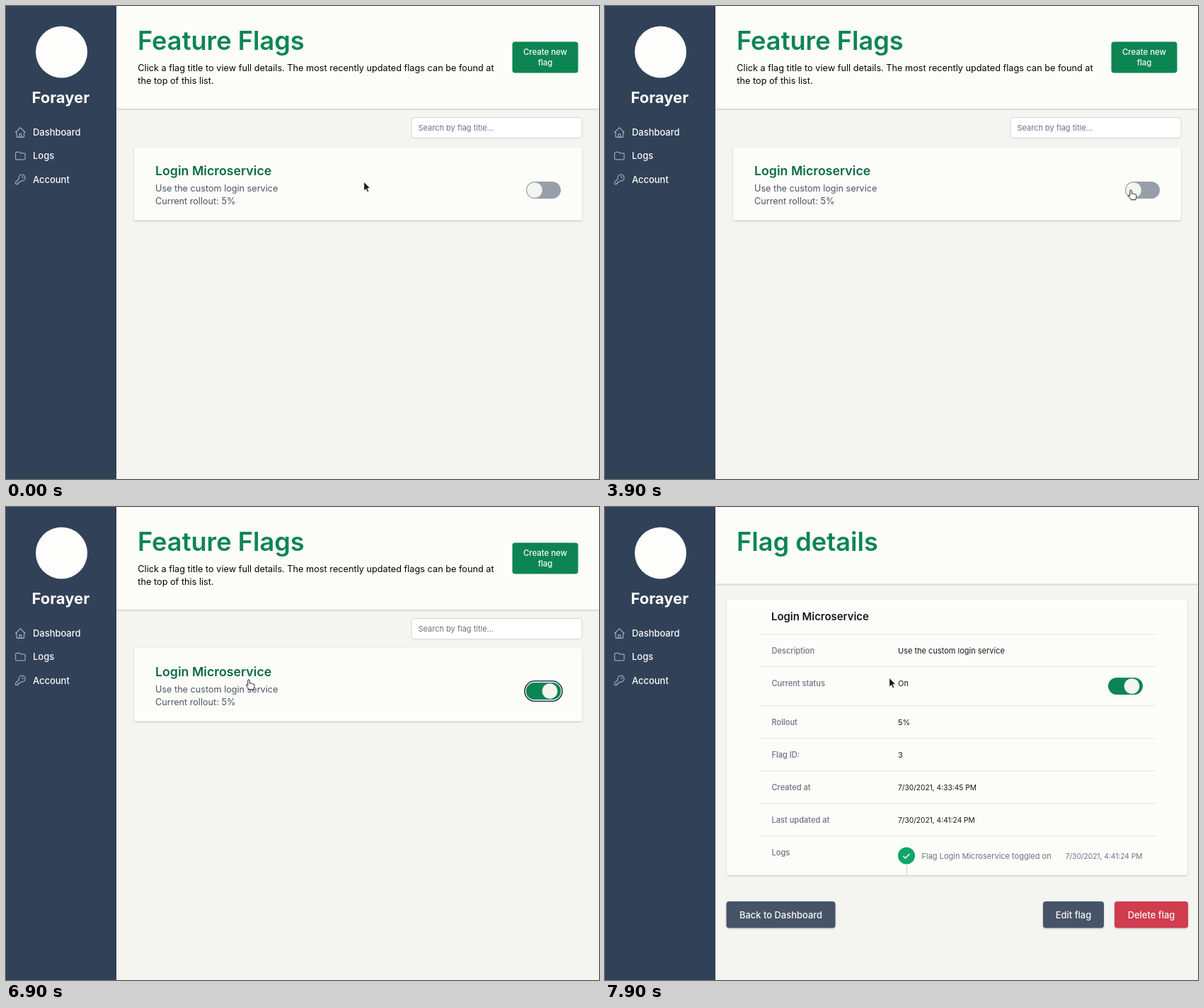
Recreate the animation shown at these times as an HTML page. Size 838x668 px, loop 8000 ms.

```html
<!DOCTYPE html>
<html lang="en">
<head>
<meta charset="utf-8">
<title>Feature Flags</title>
<style>
html, body { margin: 0; width: 838px; height: 668px; overflow: hidden; background: #f4f4f0; }
svg { display: block; }
text { font: 12.65px Inter, sans-serif; font-optical-sizing: none; fill: #4b5563; }
.title { font-size: 36.2px; font-weight: 600; fill: #0d8553; }
.name { font-size: 17.75px; font-weight: 600; fill: #0b6b45; }
.intro { font-size: 12.72px; fill: #050505; }
.brand { font-size: 22px; font-weight: 700; fill: #fdfdfb; text-anchor: middle; }
.light { font-size: 12.95px; font-weight: 500; fill: #f8f9f8; }
.mid { text-anchor: middle; }
.small { font-size: 11px; }
.create { font-size: 11.4px; }
.label { font-size: 11.05px; font-weight: 500; fill: #6b7280; }
.muted { fill: #6b7280; }
.dark { fill: #16191f; }
.date { font-size: 10.2px; }
.panel { fill: #fcfcf9; filter: drop-shadow(0 1px 1.2px #0003); }
.icon { fill: none; stroke: #98a5b3; stroke-width: 1.7; stroke-linecap: round; stroke-linejoin: round; }
.rule { stroke: #e4e6e6; }
</style>
</head>
<body>
<svg width="838" height="668" viewBox="0 0 838 668">
  <defs>
    <rect id="on" width="49" height="24" rx="12" fill="#0d8553"/>
    <circle id="knob" cx="12" cy="12" r="10.8" fill="#f4f4f0"/>
  </defs>
  <rect width="838" height="668" fill="#f4f4f0"/>

  <rect width="156" height="668" fill="#314157"/>
  <g id="brand">
    <circle cx="78.5" cy="65" r="36.5" fill="#fdfdfb"/>
    <text class="brand" x="77.3" y="137">Forayer</text>
  </g>
  <g class="icon">
    <path transform="translate(11.3 169.5) scale(.75)" d="M3 12l2-2m0 0l7-7 7 7M5 10v10a1 1 0 001 1h3m10-11l2 2m-2-2v10a1 1 0 01-1 1h-3m-6 0a1 1 0 001-1v-4a1 1 0 011-1h2a1 1 0 011 1v4a1 1 0 001 1m-6 0h6"/>
    <path transform="translate(11.3 202.7) scale(.75)" d="M3 7v10a2 2 0 002 2h14a2 2 0 002-2V9a2 2 0 00-2-2h-6l-2-2H5a2 2 0 00-2 2z"/>
    <path transform="translate(11.3 235.9) scale(.75)" d="M15 7a2 2 0 012 2m4 0a6 6 0 01-7.743 5.743L11 17H9v2H7v2H4a1 1 0 01-1-1v-2.586a1 1 0 01.293-.707l5.964-5.964A6 6 0 1121 9z"/>
  </g>
  <text class="light" x="38" y="183">Dashboard</text>
  <text class="light" x="38" y="216.3">Logs</text>
  <text class="light" x="38" y="249.5">Account</text>

  <g id="list">
    <rect class="panel" x="156" width="682" height="145"/>
    <text class="title" x="186" y="62">Feature Flags</text>
    <text class="intro" x="186.3" y="92.2">Click a flag title to view full details. The most recently updated flags can be found at</text>
    <text class="intro" x="186.3" y="110.2">the top of this list.</text>
    <rect x="715.5" y="50.5" width="93" height="44" rx="4" fill="#0d8553"/>
    <text class="light create mid" x="762" y="69">Create new</text>
    <text class="light create mid" x="762" y="84">flag</text>
    <rect x="573" y="157.5" width="241" height="29" rx="4" fill="#fff" stroke="#d1d5d8"/>
    <text class="small muted" x="582.5" y="176">Search by flag title...</text>
    <rect class="panel" x="181" y="199.5" width="633" height="103" rx="1.5"/>
    <text class="name" x="211" y="239">Login Microservice</text>
    <text x="211" y="262">Use the custom login service</text>
    <text x="211" y="280">Current rollout: 5%</text>
    <rect id="ring" x="733" y="245.8" width="53" height="28.5" rx="14.2" fill="#fff" stroke="#22364a" stroke-width="1.6"/>
    <g transform="translate(735 248)">
      <rect width="49" height="24" rx="12" fill="#979fa8"/>
      <use id="green" href="#on"/>
      <use id="slider" href="#knob"/>
    </g>
  </g>

  <g id="details">
    <rect class="panel" x="156" width="682" height="108.5"/>
    <text class="title" x="186" y="62">Flag details</text>
    <rect class="panel" x="172" y="131" width="651" height="389" rx="4"/>
    <text class="dark" x="235" y="160" style="font-size:14.9px;font-weight:600">Login Microservice</text>
    <g id="rows"></g>
    <use href="#on" x="711" y="241"/>
    <use href="#knob" x="732.5" y="241"/>
    <path class="rule" d="M426.5 504v16" style="stroke:#d3d6d8"/>
    <circle cx="426" cy="492.5" r="12" fill="#10a56a"/>
    <path d="M421.5 493l3 3 6-6.3" fill="none" stroke="#fff" stroke-width="1.5"/>
    <text class="small muted" x="447.5" y="496.5">Flag Login Microservice toggled on</text>
    <text class="date muted" x="759.5" y="496.5" text-anchor="end">7/30/2021, 4:41:24 PM</text>
    <g id="buttons"></g>
  </g>

  <g id="status">
    <path d="M-1 653.5H240a3 3 0 0 1 3 3V669H-1z" fill="#2b2c2e" stroke="#4a4b4d"/>
    <text x="2" y="665" style="font:11.2px 'Noto Sans',sans-serif;fill:#e6e6e6">Waiting for localhost…</text>
  </g>

  <g id="cursor" stroke-linejoin="round">
    <path id="arrow" d="M-.2 .3V13L2.7 10.4 4.8 14.8 6.8 13.8 4.8 9.6H8.7Z" fill="#161616" stroke="#fff" stroke-width=".8"/>
    <path id="hand" d="M-1.2 1.2a1.3 1.3 0 0 1 2.6 0V5.2c.4-.7 2.2-.6 2.4.4 .5-.6 2.1-.4 2.2.6 .6-.5 1.9-.1 1.9 1V9.5c0 2-1 2.5-1 4.2H.3C-.2 12-3 9.5-3.4 8c-.2-1 1-1.3 1.6-.6l.6.8z" fill="#fff" stroke="#1b1b1b"/>
  </g>
</svg>
<script>
const $ = id => document.getElementById(id);
const LOOP = 8000, STEP = 100;
const TOGGLE_AT = 4000, STATUS_AT = 7200, BLANK_AT = 7700, DETAILS_AT = 7900;

// label, value, baseline, y of the rule above
const rows = [
  ["Description", "Use the custom login service", 206.5, 179.5],
  ["Current status", "On", 252.5, 225.5],
  ["Rollout", "5%", 307.5, 280.5],
  ["Flag ID:", "3", 353.5, 326.5],
  ["Created at", "7/30/2021, 4:33:45 PM", 399.5, 372.5],
  ["Last updated at", "7/30/2021, 4:41:24 PM", 445.5, 418.5],
  ["Logs", "", 492, 464.5]
];
$("rows").innerHTML = rows.map(([label, value, y, rule]) => `
  <path class="rule" d="M218 ${rule}H778"/>
  <text class="label" x="235.5" y="${y}">${label}</text>
  <text class="dark ${value.includes("/") ? "date" : "small"}" x="414" y="${y}">${value}</text>`).join("");

const buttons = [
  ["Back to Dashboard", 171.5, 154, "#475468"],
  ["Edit flag", 619, 86, "#475468"],
  ["Delete flag", 720, 104, "#cf3d4f"]
];
$("buttons").innerHTML = buttons.map(([label, x, width, color]) => `
  <rect class="panel" x="${x}" y="557" width="${width}" height="37.5" rx="4" style="fill:${color}"/>
  <text class="light mid" x="${x + width / 2}" y="580.5">${label}</text>`).join("");

// pointer path: time, x, y
const path = [
  [500, 506, 248], [900, 467, 252], [1000, 467, 252], [1400, 402, 262],
  [1600, 402, 262], [1900, 392, 266], [2000, 392, 266], [2100, 410, 268],
  [2300, 511, 264], [2600, 620, 277], [2900, 690, 266], [3400, 748, 254],
  [3800, 748, 254], [3900, 743, 260], [4100, 743, 260], [4400, 600, 288],
  [4500, 607, 291], [5500, 607, 291], [5700, 607, 314], [5800, 607, 314],
  [5900, 598, 323], [6100, 440, 306], [6200, 408, 297], [6300, 408, 297],
  [6500, 407, 275], [6600, 407, 275], [6800, 350, 246], [6900, 343, 244],
  [7600, 343, 244], [7700, 357, 240], [7900, 402, 241]
];

function pointer(t) {
  const next = path.findIndex(p => p[0] >= t);
  if (next < 1) return path.at(next).slice(1);
  const [t0, x0, y0] = path[next - 1], [t1, x1, y1] = path[next];
  const k = (t - t0) / (t1 - t0);
  return [x0 + (x1 - x0) * k, y0 + (y1 - y0) * k];
}

const show = (id, visible) => $(id).style.display = visible ? "" : "none";

function draw(now) {
  const t = Math.floor(now % LOOP / STEP) * STEP;
  const on = Math.min(1, Math.max(0, (t - TOGGLE_AT) / 200));
  const [x, y] = pointer(t);
  const overToggle = x > 735 && x < 784 && y > 248 && y < 272;
  const overTitle = x < 377 && y < 250;
  const hand = t < BLANK_AT && (overToggle || overTitle);

  show("list", t < BLANK_AT);
  show("details", t >= DETAILS_AT);
  show("brand", t < BLANK_AT || t >= DETAILS_AT);
  show("status", t >= STATUS_AT && t < DETAILS_AT);
  show("ring", on > 0);
  $("green").style.opacity = on;
  $("slider").setAttribute("x", 21.5 * on);
  show("hand", hand);
  show("arrow", !hand);
  $("cursor").setAttribute("transform", `translate(${x} ${y})`);
  requestAnimationFrame(draw);
}
requestAnimationFrame(draw);
</script>
</body>
</html>
```
